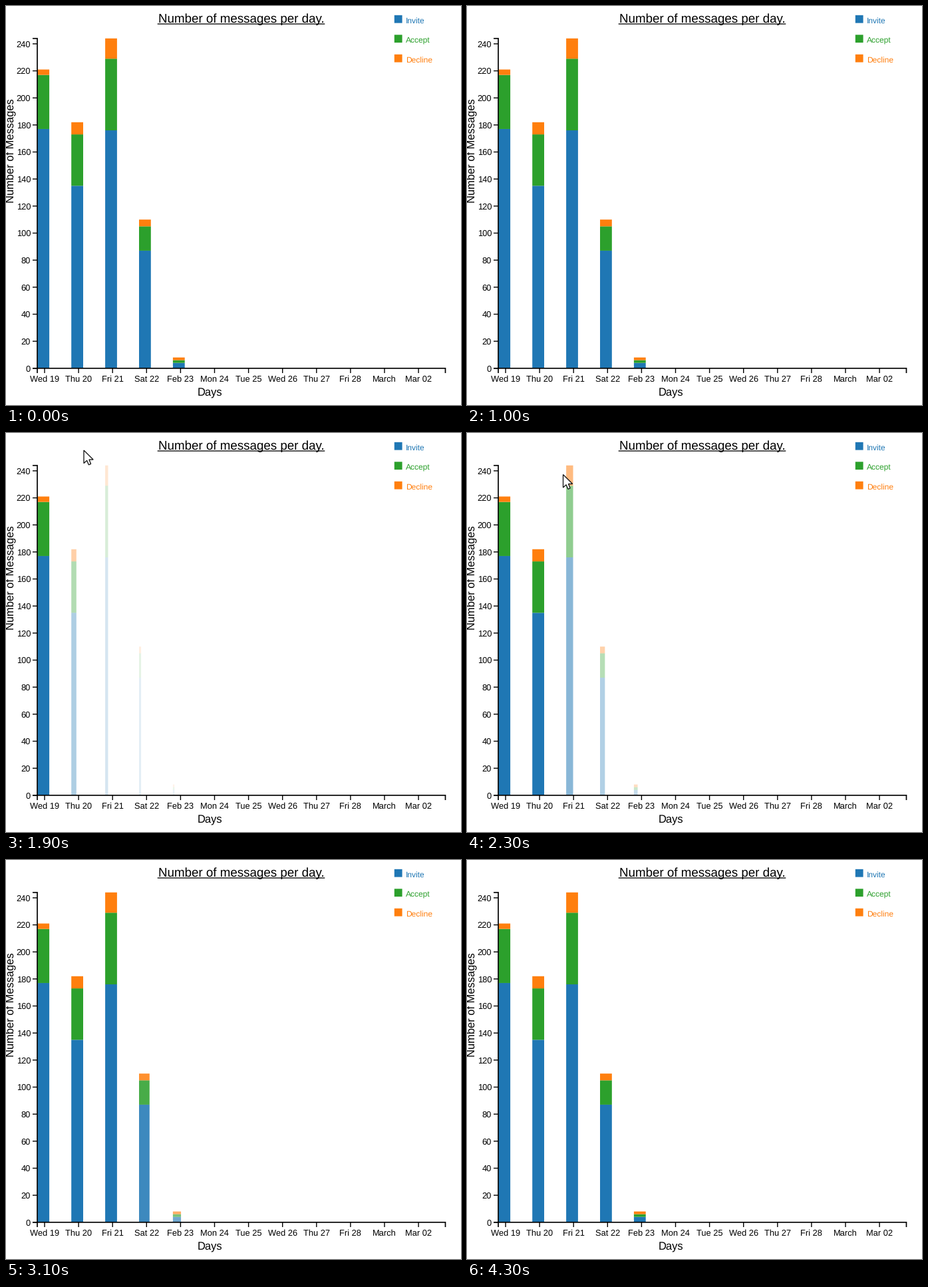
Animation of 684 by 600 pixels, one loop 4.6 s. Source, as a matplotlib script:

```python
import matplotlib.pyplot as plt
import numpy as np
from matplotlib.animation import FuncAnimation
from matplotlib.patches import Polygon, Rectangle

W, H, DPI = 684, 600, 100
STEP, LOOP = 100, 4600
RELOAD, BLANK, READY = 1610, 1800, 1900
BASE, UNIT, TOP = 544.8, 2.033, 48.8
LEFT, RIGHT, PITCH = 47, 660.5, 51.1
BAR_X, BAR_PITCH, BAR_W = 47.3, 50.9, 17.8

SERIES = [("Invite", "#1f77b4"), ("Accept", "#2ca02c"), ("Decline", "#ff7f0e")]
DAYS = ["Wed 19", "Thu 20", "Fri 21", "Sat 22", "Feb 23", "Mon 24", "Tue 25",
        "Wed 26", "Thu 27", "Fri 28", "March", "Mar 02"]
COUNTS = [(177, 40, 4), (135, 38, 9), (176, 53, 15), (87, 18, 5), (4, 2, 2)]

plt.rcParams.update({"font.family": "Liberation Sans", "text.hinting": "none",
                     "toolbar": "None"})
fig = plt.figure(figsize=(W / DPI, H / DPI), dpi=DPI, facecolor="white")
ax = fig.add_axes([0, 0, 1, 1])
ax.set_xlim(0, W)
ax.set_ylim(H, 0)
ax.axis("off")

page = []


def pt(px):
    return px * 72 / DPI


def label(x, y, text, size, ha="center", color="black", rotation=0):
    page.append(ax.text(x, y, text, fontsize=pt(size), ha=ha, va="baseline",
                        color=color, rotation=rotation,
                        rotation_mode="anchor"))


def line(xs, ys, width=1.4):
    page.extend(ax.plot(xs, ys, color="black", lw=pt(width), zorder=3,
                        snap=False, solid_capstyle="butt",
                        solid_joinstyle="miter"))


def box(x, y, w, h, color):
    patch = Rectangle((x, y), w, h, fc=color, ec="none", lw=0, zorder=2,
                      snap=False)
    page.append(ax.add_patch(patch))
    return patch


# Axes and labels
line([40, LEFT, LEFT, 40], [TOP, TOP, BASE, BASE], 1.7)
line([LEFT, LEFT, RIGHT, RIGHT], [552, BASE, BASE, 552], 1.7)
for value in range(0, 241, 20):
    y = BASE - value * UNIT
    line([40, LEFT], [y, y])
    label(37, y + 4.6, str(value), 12.9, ha="right")
for i, day in enumerate(DAYS):
    x = 58 + i * PITCH
    line([x, x], [BASE, 552])
    label(x, 564.7, day, 12.9)

label(353.5, 25.4, "Number of messages per day.", 18.8)
line([227.7, 479.3], [27, 27], 1.3)
label(306.5, 586.4, "Days", 16.5)
label(11.2, 218, "Number of Messages", 16.5, rotation=90)

for i, (name, color) in enumerate(SERIES):
    y = 13.8 + 29.5 * i
    box(583.8, y, 11.8, 11.8, color)
    label(601, y + 11.6, name, 12, ha="left", color=color)

# Stacked bars, one list of segments per day
bars = []
for i, counts in enumerate(COUNTS):
    total, stack = 0, []
    for count, (_, color) in zip(counts, SERIES):
        total += count
        stack.append(box(BAR_X + BAR_PITCH * i, BASE - total * UNIT, BAR_W,
                         count * UNIT, color))
    bars.append(stack)

ARROW = 1.15 * np.array([(0, 0), (0, 17), (4, 13.3), (6.4, 19), (9.2, 17.8),
                         (6.9, 12.2), (12.3, 12.2)])
cursor = ax.add_patch(Polygon(ARROW, fc="white", ec="#111111", lw=pt(1.3),
                              joinstyle="miter", zorder=5))
PATH_T = [1600, 1700, 1900, 2300, 2400, 2700]
PATH_X = [112, 116.8, 117, 144.5, 165, 652.5]
PATH_Y = [20, 25.5, 26, 62.5, 85, 588.5]


def progress(i, t):
    """Share of the entrance of bar i; later bars take longer."""
    if t < BLANK:
        return 1.0
    return min(1.0, (t - RELOAD) / (180 + 500 * i))


def update(frame):
    t = frame * STEP
    shown = not BLANK <= t < READY
    for artist in page:
        artist.set_visible(shown)
    for i, stack in enumerate(bars):
        p = progress(i, t)
        for segment in stack:
            segment.set_width(BAR_W * p)
            segment.set_alpha(p ** 1.2)
    cursor.set_visible(PATH_T[0] <= t <= PATH_T[-1])
    tip = np.interp(t, PATH_T, PATH_X), np.interp(t, PATH_T, PATH_Y)
    cursor.set_xy(ARROW + tip)
    return page + [cursor]


anim = FuncAnimation(fig, update, frames=LOOP // STEP, interval=STEP,
                     repeat=True, repeat_delay=0, blit=False)
plt.show()
```
